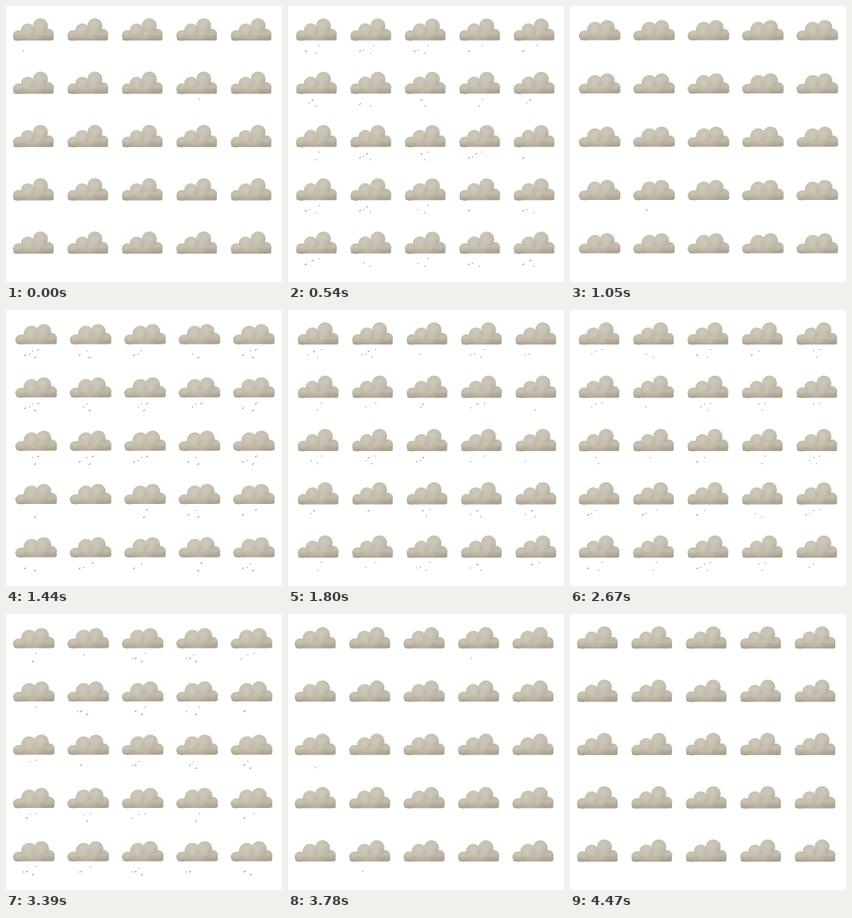
Animation of 360x360 px, one loop 4500 ms. Source, as an HTML page with a canvas:

```html
<!DOCTYPE html>
<html lang="en">
<head>
<meta charset="utf-8">
<title>Rain clouds</title>
<style>
html, body { margin: 0; width: 100%; height: 100%; overflow: hidden; background: #fff; }
canvas { display: block; width: 360px; height: 360px; }
</style>
</head>
<body>
<canvas width="360" height="360"></canvas>
<script>
const ctx = document.querySelector('canvas').getContext('2d');
const LOOP = 4500, STEP = 30, GRID = 5;
const DRY_TIMES = [0, 1050, 3780, LOOP];
const LIGHT = '218,212,199', DARK = '150,141,122';

function ramp(from, to, v) {
  const u = Math.min(1, Math.max(0, (v - from) / (to - from)));
  return u * u * (3 - 2 * u);
}

function random(a, b = 0, c = 0) {
  const n = Math.sin(a * 12.9898 + b * 78.233 + c * 37.719) * 43758.5453;
  return n - Math.floor(n);
}

const swayAt = t => 11 + 2 * Math.sin(2 * Math.PI * (t - 650) / LOOP);

// Two squashes per loop, mirrored about its middle.
function squashAt(t) {
  const d = Math.abs(t - LOOP / 2);
  return ramp(450, 650, d) * (1 - ramp(1250, 1800, d));
}

// The showers fade out around each dry time.
function rainAt(t) {
  const d = Math.min(...DRY_TIMES.map(dry => Math.abs(t - dry)));
  return .01 + .55 * ramp(0, 300, d);
}

// Puffs sit relative to the cloud's bottom left corner.
// While squashed the middle puff swells and the tall one sinks.
function cloudPuffs(s) {
  return [
    { x: 7, y: -7, rx: 7.3 + .4 * s, ry: 7 - .5 * s },
    { x: 19 + 1.5 * s, y: -14 - s, rx: 8.9 + 1.3 * s, ry: 8.8 + 1.2 * s },
    { x: 35.5 + s, y: -19.7 + 2.2 * s, rx: 9.8, ry: 9.8 },
    { x: 46 + .5 * s, y: -8.8, rx: 7 + .3 * s, ry: 7 },
    { x: 27, y: -9.5, rx: 20, ry: 8.5 }
  ];
}

function cloudPath(puffs, s) {
  const path = new Path2D();
  for (const { x, y, rx, ry } of puffs) {
    path.moveTo(x + rx, y);
    path.ellipse(x, y, rx, ry, 0, 0, 2 * Math.PI);
  }
  path.roundRect(.3, -8, 52.4 + s, 7.4 - .4 * s, 2.5 + s);
  return path;
}

function glow(x, y, r, color, alpha) {
  const g = ctx.createRadialGradient(x, y, 0, x, y, r);
  g.addColorStop(0, `rgba(${color},${alpha})`);
  g.addColorStop(1, `rgba(${color},0)`);
  ctx.fillStyle = g;
  ctx.fillRect(x - r, y - r, 2 * r, 2 * r);
}

function drawCloud(x, y, squash) {
  const puffs = cloudPuffs(squash);
  ctx.save();
  ctx.translate(x, y);
  ctx.clip(cloudPath(puffs, squash));
  const body = ctx.createLinearGradient(0, -30, 0, 0);
  body.addColorStop(0, '#c4beaf');
  body.addColorStop(.7, '#c1baaa');
  body.addColorStop(1, '#a79e8c');
  ctx.fillStyle = body;
  ctx.fillRect(-2, -32, 60, 34);
  for (const p of puffs) {
    glow(p.x + p.rx * .75, p.y + p.ry * .5, p.rx * .7, DARK, .2);
    glow(p.x - 1, p.y - 2, p.rx, LIGHT, .4);
  }
  for (let i = 0; i < 10; i++) {
    glow(4 + 46 * random(i, 1), -3 - 20 * random(i, 2), 5, i % 2 ? DARK : LIGHT, .12);
  }
  ctx.restore();
}

// Five slanted-in-place drops flicker on and off under each cloud.
function drawRain(x, y, cell, tick, amount) {
  ctx.fillStyle = '#80746a';
  for (let n = 0; n < 5; n++) {
    if (random(cell, n, tick) > amount) continue;
    const px = Math.round(x + 12.5 + 4.3 * n);
    const py = Math.round(y + 10.5 + 5 * Math.sin(2.6 * n + .4));
    ctx.fillRect(px, py, 1, 1);
    if (random(n, tick, 4) > .7) ctx.fillRect(px - 1, py + 1, 1, 1);
  }
}

function draw(now) {
  const tick = Math.floor((now % LOOP) / STEP), t = tick * STEP;
  const sway = swayAt(t), squash = squashAt(t), rain = rainAt(t);
  ctx.fillStyle = '#fff';
  ctx.fillRect(0, 0, 360, 360);
  for (let cell = 0; cell < GRID * GRID; cell++) {
    const x = sway + 71 * (cell % GRID);
    const y = 45.5 + 69.5 * Math.floor(cell / GRID);
    drawCloud(x, y, squash);
    drawRain(x, y, cell, tick, rain);
  }
}

const start = performance.now();
function frame() {
  draw(performance.now() - start);
  requestAnimationFrame(frame);
}
frame();
</script>
</body>
</html>
```
